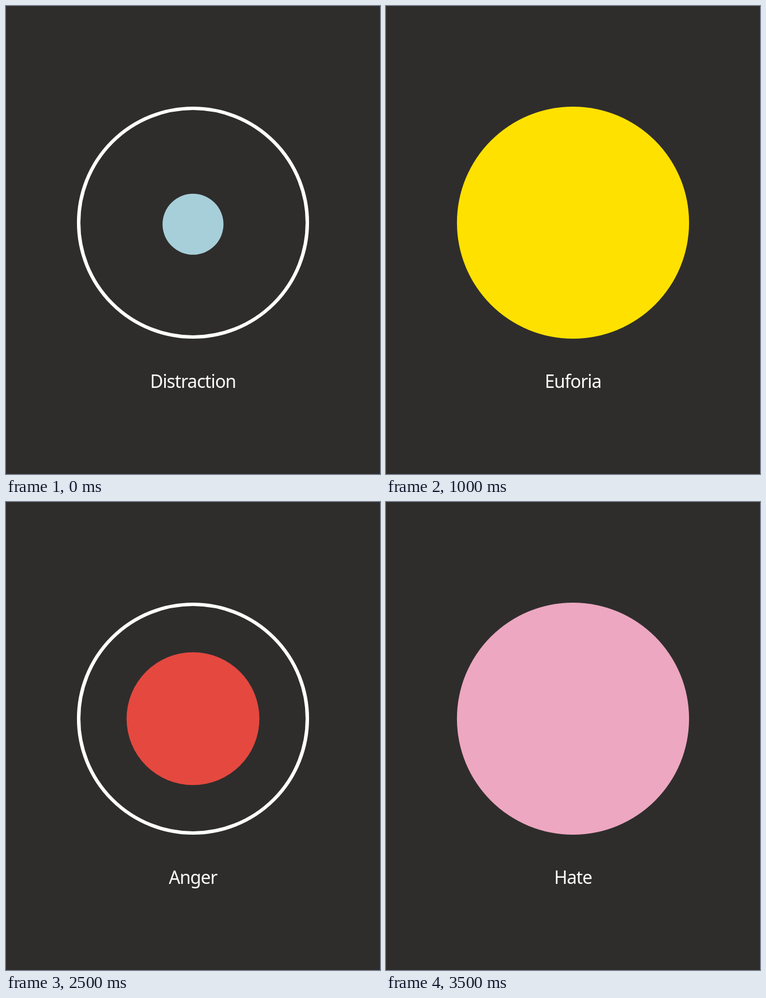
An HTML page with a canvas for the animation above (4000 ms loop, 669 by 837 pixels).

```html
<!DOCTYPE html>
<html lang="en">
<head>
<meta charset="utf-8">
<title>Emotions</title>
<style>
  html, body { margin: 0; width: 100%; height: 100%; overflow: hidden; background: #2e2d2c; }
  canvas { display: block; }
</style>
</head>
<body>
<canvas id="stage" width="669" height="837"></canvas>
<script>
const ctx = document.getElementById("stage").getContext("2d");
const STEP = 500;
const CENTER_X = 334.5;
const CENTER_Y = 387.5;

const SMALL = { radius: 54.5, y: 390.3 };
const MEDIUM = { radius: 118.8, y: CENTER_Y };
const FULL = { radius: 207.6, y: CENTER_Y };

const emotions = [
  { label: "Distraction", color: "#a7cfd9", size: SMALL },
  { label: "Trust", color: "#8dc48a", size: MEDIUM },
  { label: "Euforia", color: "#ffe100", size: FULL },
  { label: "Anticipation", color: "#f58d33", size: SMALL },
  { label: "Fear", color: "#af98c4", size: MEDIUM },
  { label: "Anger", color: "#e5483f", size: MEDIUM },
  { label: "Sadness", color: "#506fa7", size: MEDIUM },
  { label: "Hate", color: "#eda7c1", size: FULL }
];

function circlePath(y, radius) {
  ctx.beginPath();
  ctx.arc(CENTER_X, y, radius, 0, Math.PI * 2);
}

function draw({ label, color, size }) {
  ctx.fillStyle = "#2e2d2c";
  ctx.fillRect(0, 0, 669, 837);

  if (size !== FULL) {
    ctx.strokeStyle = "#fff";
    ctx.lineWidth = 6.2;
    circlePath(CENTER_Y, 204.5);
    ctx.stroke();
  }

  ctx.fillStyle = color;
  circlePath(size.y, size.radius);
  ctx.fill();

  ctx.fillStyle = "#fff";
  ctx.font = '32px "Noto Sans", sans-serif';
  ctx.letterSpacing = "-0.9px";
  ctx.textAlign = "center";
  ctx.fillText(label, CENTER_X, 682.5);
}

function tick() {
  draw(emotions[Math.floor(performance.now() / STEP) % emotions.length]);
  requestAnimationFrame(tick);
}
tick();
</script>
</body>
</html>
```
